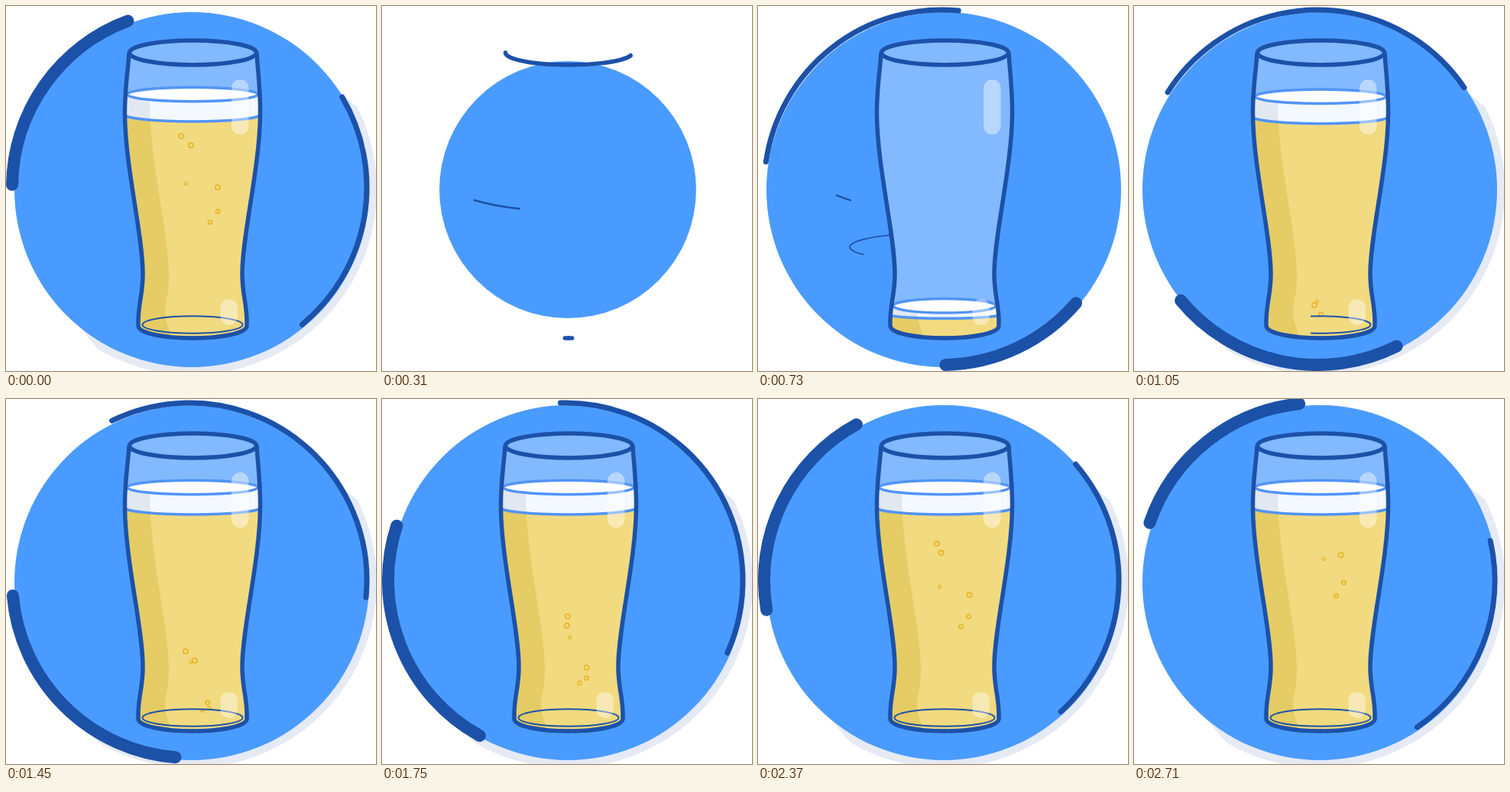
Animation, 484 px wide and 477 px high, one loop 2.73 s. Source, as an HTML page with a canvas:

```html
<!DOCTYPE html>
<html lang="en">
<head>
<meta charset="utf-8">
<title>Beer glass</title>
<style>
  html, body { margin: 0; width: 100%; height: 100%; overflow: hidden; background: #fff; }
  canvas { display: block; width: 484px; height: 477px; }
</style>
</head>
<body>
<canvas id="stage" width="484" height="477"></canvas>
<script>
const ctx = document.getElementById('stage').getContext('2d');
const LOOP = 2730;
const POSTER = 2495; // pose held for the first 20 ms
const NAVY = '#1c51a8', BLUE = '#4a9bff', LINE = '#5194f7', GOLD = '#e8b92c';
const TAU = Math.PI * 2;

const rad = deg => deg * Math.PI / 180;
const mix = (a, b, p) => a + (b - a) * p;
const ramp = (t, from, to) => Math.min(1, Math.max(0, (t - from) / (to - from)));
const smooth = (t, from, to) => {
  const u = ramp(t, from, to);
  return u * u * (3 - 2 * u);
};

// Smooth curve through the given keys, held at both ends.
function track(t, times, values) {
  const last = times.length - 1;
  if (t <= times[0]) return values[0];
  if (t >= times[last]) return values[last];
  let i = 0;
  while (t > times[i + 1]) i++;
  const slope = k => {
    const a = Math.max(0, k - 1), b = Math.min(last, k + 1);
    return (values[b] - values[a]) / (times[b] - times[a]);
  };
  const h = times[i + 1] - times[i], u = (t - times[i]) / h;
  const u2 = u * u, u3 = u2 * u;
  return (2 * u3 - 3 * u2 + 1) * values[i] + (u3 - 2 * u2 + u) * h * slope(i) +
    (3 * u2 - 2 * u3) * values[i + 1] + (u3 - u2) * h * slope(i + 1);
}

function lerpTable(x, xs, ys) {
  let i = 0;
  while (i < xs.length - 2 && x > xs[i + 1]) i++;
  return mix(ys[i], ys[i + 1], ramp(x, xs[i], xs[i + 1]));
}

function stroke(color, width, path) {
  ctx.strokeStyle = color;
  ctx.lineWidth = width;
  path ? ctx.stroke(path) : ctx.stroke();
}

function fill(color, path) {
  ctx.fillStyle = color;
  path ? ctx.fill(path) : ctx.fill();
}

function arc(x, y, rx, ry, from, to, color, width) {
  if (to - from < 0.2) return;
  ctx.beginPath();
  ctx.ellipse(x, y, rx, ry, 0, rad(from), rad(to));
  stroke(color, width);
}

const half = {
  right: new Path2D('M244 434C280 434 315 428 315 418C316 390 309 380 309 350C309 300 332 210 332.5 142C333 110 329 80 328 62'),
  left: new Path2D('M244 434C208 434 173 428 173 418C172 390 179 380 179 350C179 300 156 210 155.5 142C155 110 160 80 161 62')
};
const HALF_LENGTH = 465;
const glass = new Path2D('M161 62C160 80 155 110 155.5 142C156 210 179 300 179 350C179 380 172 390 173 418C173 428 208 434 244 434' +
  'C280 434 315 428 315 418C316 390 309 380 309 350C309 300 332 210 332.5 142C333 110 329 80 328 62A83.5 16 0 0 0 161 62Z');
const shade = new Path2D('M140 90L188 90L188 126C189 215 213 290 213 355C213 380 206 395 209 408Q212 422 219 440L140 440Z');

const radiusAt = y => lerpTable(y,
  [62, 115, 140, 175, 250, 310, 350, 375, 395],
  [84, 88, 88.5, 86, 76, 68, 65.5, 67.5, 70]) - 2.5;

function drawDisc(t) {
  const fade = smooth(t, 700, 950);
  if (fade > 0) {
    ctx.globalAlpha = fade;
    ctx.beginPath();
    ctx.arc(243, 240, 242, rad(-26.5), rad(120.5));
    ctx.lineTo(93, 416);
    ctx.lineTo(243, 240);
    ctx.lineTo(439, 115);
    ctx.closePath();
    fill('#e5eaf4');
    ctx.globalAlpha = 1;
  }
  const u = ramp(t, 50, 600);
  ctx.beginPath();
  ctx.arc(243, 240, 232 * u * (2 - u), 0, TAU);
  fill(BLUE);
}

const ringTimes = [510, 730, 1050, 1450, 2050, 2710];
const rings = [
  { width: 7, tail: [172, 188.2, 212.3, 244, 292.8, 347.1], head: [172, 275.2, 325.7, 365.4, 397.9, 415.8] },
  { width: 16, tail: [25, 40.6, 63.4, 94.5, 143.6, 198.9], head: [25, 88.5, 140.3, 175, 219.4, 264.1] }
];

function drawRings(t) {
  for (const r of rings) {
    arc(240, 237, 232, 232, track(t, ringTimes, r.tail), track(t, ringTimes, r.head), NAVY, r.width);
  }
}

function drawSwooshes(t) {
  const upper = [200, 310, 730, 850], lower = [550, 730, 950];
  arc(244, 224.5, 165, 44, track(t, upper, [95, 112.8, 138.2, 151]),
    track(t, upper, [95, 138.2, 148.7, 151]), NAVY, 2.4);
  arc(244, 315, 124, 19, track(t, lower, [100, 149, 236]),
    track(t, lower, [100, 234.5, 236]), NAVY, 1.8);
}

const bubbleTimes = [1050, 1450, 2050, POSTER, 2710];
const bubbles = [
  { born: 950, y: 330, speed: 0.153, r: 3.1, x: [236, 235, 248, 229, 234] },
  { born: 970, y: 342, speed: 0.153, r: 3.1, x: [244.5, 247, 237, 242, 250] },
  { born: 950, y: 344, speed: 0.107, r: 2, x: [239, 242, 247, 235.5, 248] },
  { born: 1370, y: 397, speed: 0.153, r: 3.1, x: [260, 263.5, 272, 277, 270.5] },
  { born: 1380, y: 404, speed: 0.13, r: 2.6, x: [264, 266, 270, 277, 274.5] },
  { born: 1380, y: 407, speed: 0.119, r: 2.5, x: [255, 257, 260.5, 267, 264.5] }
];

function drawBubbles(t) {
  for (const b of bubbles) {
    const size = smooth(t, b.born, b.born + 100);
    if (!size) continue;
    ctx.beginPath();
    ctx.arc(track(t, bubbleTimes, b.x), b.y - b.speed * (t - 1450), b.r * size, 0, TAU);
    stroke(GOLD, b.r > 2.2 ? 1.8 : 1.4);
  }
}

// Region above or below a sagging surface line.
function sag(y, edge) {
  ctx.beginPath();
  ctx.ellipse(244, y, 89, 9, 0, Math.PI, 0, true);
  ctx.lineTo(333, edge);
  ctx.lineTo(155, edge);
  ctx.closePath();
}

function drawBeer(t) {
  if (t < 640) return;
  const top = mix(427, 115.5, smooth(t, 640, 1075));
  const foam = mix(7.5, 26.5, smooth(t, 730, 1000));
  const base = top + foam;
  const rx = radiusAt(top);

  ctx.save();
  ctx.clip(glass);
  sag(base, 440);
  fill('#f2da80');

  ctx.save();
  ctx.beginPath();
  ctx.rect(140, top, 210, 330);
  ctx.clip();
  fill('#e5cc65', shade);
  ctx.restore();

  drawBubbles(t);

  ctx.save();
  sag(base, top);
  ctx.clip();
  ctx.fillStyle = '#f3f9ff';
  ctx.fillRect(150, top, 190, 60);
  fill('#e2e8f1', shade);
  ctx.restore();

  arc(244, base, 89, 9, 0, 180, LINE, 3.5);
  ctx.beginPath();
  ctx.ellipse(244, top, rx, 9.3, 0, 0, TAU);
  fill('#fff');
  stroke(LINE, 3.5);
  ctx.restore();
}

function pill(x, y, w, h) {
  ctx.beginPath();
  ctx.roundRect(x, y, w, h, w / 2);
  fill('rgba(255,255,255,0.42)');
}

function drawGlass(t) {
  const fade = smooth(t, 480, 650);
  if (fade > 0) {
    ctx.globalAlpha = fade;
    fill('#82b9ff', glass);
    ctx.beginPath();
    ctx.ellipse(244.5, 61, 83.5, 16, 0, 0, TAU);
    fill('#82b9ff');
    ctx.globalAlpha = 1;
  }
  drawBeer(t);

  const base = smooth(t, 900, 1180);
  arc(244, 416.5, 65.5, 11.3, -180 * base, 180 * base, NAVY, 2);

  if (fade > 0) {
    ctx.globalAlpha = fade;
    pill(295, 96, 22.5, 72);
    pill(280.5, 383, 22.5, 34);
    ctx.globalAlpha = 1;
  }

  const side = smooth(t, 290, 650);
  if (side > 0) {
    if (side < 1) ctx.setLineDash([HALF_LENGTH * side, 2000]);
    stroke(NAVY, 5.5, half.left);
    stroke(NAVY, 5.5, half.right);
    ctx.setLineDash([]);
  }
  const rim = smooth(t, 140, 500);
  arc(244.5, 61, 83, 16, 180 - 360 * rim, 180, NAVY, 5.5);
}

function draw(time) {
  const t = time < 20 ? POSTER : time;
  ctx.clearRect(0, 0, 484, 477);
  ctx.lineCap = 'round';
  ctx.lineJoin = 'round';
  drawDisc(t);
  drawSwooshes(t);
  drawRings(t);
  drawGlass(t);
}

const start = performance.now();
function tick() {
  draw((performance.now() - start) % LOOP);
  requestAnimationFrame(tick);
}
tick();
</script>
</body>
</html>
```
